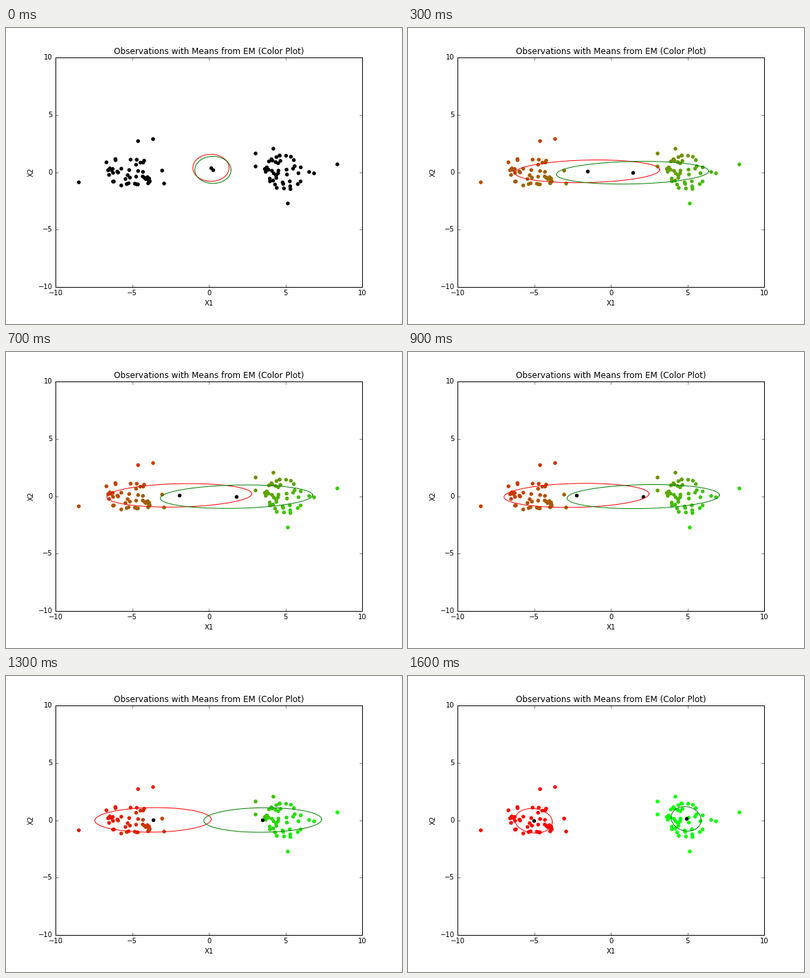
A matplotlib script for the animation above (2.8 s loop, 576 by 432 pixels).

```python
import numpy as np
import matplotlib.pyplot as plt
from matplotlib.animation import FuncAnimation

plt.style.use("classic")
plt.rcParams.update({
    "font.family": "DejaVu Sans",
    "font.size": 10,
    "text.kerning_factor": 0,
    "figure.facecolor": "white",
    "figure.subplot.bottom": 0.125,
    "savefig.dpi": 72,
})

WIDTH, HEIGHT, DPI = 576, 432, 72
LAST_STEP, FRAMES, INTERVAL = 16, 28, 100
FIRST_GAP, LAST_GAP = 1.4, 4.97
TOTAL_VARIANCE = 26.0

rng = np.random.default_rng(4)


def cluster(center, radii, count, outliers):
    """A slightly leaning blob, dense in the middle, plus its outliers."""
    angle = rng.uniform(0, 2 * np.pi, count)
    reach = rng.uniform(0, 1, count) ** 0.55
    dx = radii[0] * reach * np.cos(angle)
    dy = radii[1] * reach * np.sin(angle) - 0.2 * dx
    blob = np.column_stack([center[0] + dx, center[1] + dy])
    return np.vstack([blob, outliers])


points = np.vstack([
    cluster((-4.95, -0.15), (1.7, 1.5), 43,
            [(-8.48, -.87), (-6.68, .87), (-4.62, 2.72), (-3.64, 2.9),
             (-3.05, .15), (-2.92, -.98)]),
    cluster((4.85, 0.05), (1.25, 1.6), 43,
            [(8.37, .69), (6.85, -.09), (6.53, .03), (5.14, -2.72),
             (4.2, 2.06), (3.04, 1.64), (3.04, .51)]),
])


def half_gap(step):
    """Half the distance between the means: slow at first, then a rush."""
    return min(max(0.681 - 0.041 * step, 0.01) ** (-2 / 3), LAST_GAP)


def components(step):
    """Mean x, mean y, spread x, spread y, correlation for red and green."""
    if step == 0:
        return (.13, .39, 1.18, 1.18, 0), (.26, .21, 1.18, 1.18, 0)
    gap = half_gap(step)
    p = (gap - FIRST_GAP) / (LAST_GAP - FIRST_GAP)
    spread_x = np.sqrt(23.5 - 34.3 * max(0, p - 0.35))
    spread_y = min(1.07, 0.985 + 0.3 * p)
    skew = 0.025 - 0.135 * p ** 4
    rho = 0.14 - 0.24 * p ** 2
    red = (-.07 - gap, .085 - .13 * p ** 2,
           spread_x * (1 - skew), spread_y, rho)
    green = (-.07 + gap, -.035 + .165 * p ** 2,
             spread_x * (1 + skew), spread_y, rho)
    return red, green


def log_density(params, scale):
    mx, my, sx, sy, rho = params
    sx, sy = sx * scale, sy * scale
    u, v = (points[:, 0] - mx) / sx, (points[:, 1] - my) / sy
    rest = 1 - rho ** 2
    return -(u * u - 2 * rho * u * v + v * v) / (2 * rest) - np.log(
        sx * sy * np.sqrt(rest))


def membership_colors(step):
    """Mix red and green by how likely each component made each point."""
    if step == 0:
        return np.zeros((len(points), 3))
    red, green = components(step - 1)
    gap = (green[0] - red[0]) / 2
    scale = min(1, 2 * np.sqrt(TOTAL_VARIANCE - gap ** 2)
                / (red[2] + green[2]))
    odds = log_density(green, scale) - log_density(red, scale)
    share = 1 / (1 + np.exp(-odds))
    return np.column_stack([1 - share, share, np.zeros_like(share)])


def ellipse_xy(params):
    mx, my, sx, sy, rho = params
    t = np.linspace(0, 2 * np.pi, 50)
    return mx + sx * np.cos(t), my + sy * np.sin(t + np.arcsin(rho))


fig = plt.figure(figsize=(WIDTH / DPI, HEIGHT / DPI), dpi=DPI)
ax = fig.add_subplot()
ax.set(xlim=(-10, 10), ylim=(-10, 10),
       xticks=range(-10, 11, 5), yticks=range(-10, 11, 5),
       xlabel="X1", ylabel="X2",
       title="Observations with Means from EM (Color Plot)")

dots = ax.scatter(*points.T, s=20, color="k", linewidths=1)
means = ax.scatter([0, 0], [0, 0], s=20, color="k", linewidths=1)
outlines = [ax.plot([], [], color=c, lw=1)[0] for c in ("red", "green")]


def update(frame):
    step = min(frame, LAST_STEP)
    parts = components(step)
    dots.set_color(membership_colors(step))
    means.set_offsets([p[:2] for p in parts])
    for outline, params in zip(outlines, parts):
        outline.set_data(*ellipse_xy(params))
    return [dots, means, *outlines]


anim = FuncAnimation(fig, update, frames=FRAMES, interval=INTERVAL,
                     repeat=True, repeat_delay=0)
plt.show()
```
